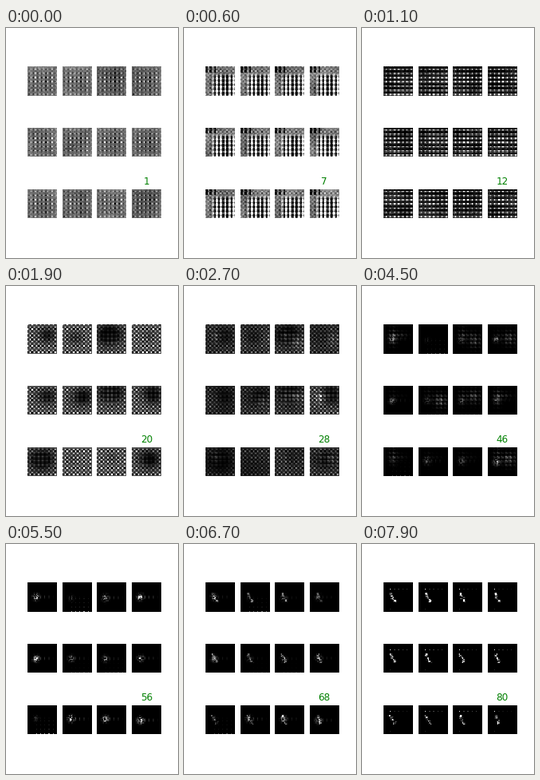
Write a matplotlib script that moves like this. It is 216 px wide and 288 px high and loops after 8 s.

```python
import numpy as np
import matplotlib.pyplot as plt
from matplotlib.animation import FuncAnimation

EPOCHS = 80
SIZE = 28
TILES = 12
Y, X = np.mgrid[:SIZE, :SIZE]
U, V = X / (SIZE - 1), Y / (SIZE - 1)
EDGE = np.minimum(np.minimum(X, SIZE - 1 - X), np.minimum(Y, SIZE - 1 - Y))
INNER = np.clip(EDGE / 5, 0, 1)


def wave(axis, shift):
    """Cosine with the four-pixel period of the upsampling artefacts."""
    return np.cos(np.pi / 2 * (axis - shift))


def dots(x, y, sharp=1.0):
    return np.exp(sharp * (wave(X, x) + wave(Y, y) - 2))


def blob(cx, cy, sx, sy):
    return np.exp(-((U - cx) / sx) ** 2 - ((V - cy) / sy) ** 2)


def ramp(x):
    return 1 / (1 + np.exp(-x))


def smooth(x):
    x = np.clip(x, 0, 1)
    return x * x * (3 - 2 * x)


def field(rng):
    """Slow random variation between about -1 and 1."""
    a, b = rng.uniform(1, 4, 2)
    p, q = rng.uniform(0, 6.3, 2)
    return np.sin(a * U + b * V + p) * np.cos(b * U - a * V + q)


def speckle(rng):
    light = rng.uniform(-0.02, 0.08)
    shade = 0.44 + light - 0.05 * INNER + 0.04 * field(rng)
    grain = 0.5 * dots(3, 2, 1.5) - 0.4 * dots(1, 2) - 0.1 * dots(3, 0)
    return shade + (0.45 + 0.55 * INNER) * grain + rng.normal(0, 0.04, U.shape)


def columns(rng):
    bars = 0.42 - 0.6 * wave(X, 0.3) - 0.3 * wave(Y, 1)
    inside = ramp((U - 0.2) / 0.05) * ramp((V - 0.27) / 0.03)
    rim = 0.48 + 0.2 * wave(X, 2) * wave(Y, 0) + 0.08 * field(rng)
    rim -= 0.4 * (V < 0.2) * (U < 0.38) * (X % 4 < 2)
    img = inside * np.clip(bars, 0, 1) + (1 - inside) * rim
    return img + 0.05 * field(rng) + rng.normal(0, 0.04, U.shape)


def crescents(rng):
    arc = 1.3 * dots(2, 2, 1.3) - 0.75 * dots(2, 1, 1.2)
    haze = 0.16 + 0.07 * field(rng) - 0.12 * dots(0, 0)
    gain = 0.85 + 0.3 * field(rng)
    return haze + gain * arc + rng.normal(0, 0.04, U.shape)


def lattice(rng):
    net = (0.5 + 0.5 * wave(X, 0) * wave(Y, 0)) ** 1.6
    depth = rng.uniform(0, 1.5)
    hole = blob(rng.normal(0.58, 0.12), rng.normal(0.36, 0.06),
                0.1 + 0.3 * depth, 0.1 + 0.25 * depth)
    hole = np.clip(depth * hole, 0, 1)
    dashes = 0.45 * dots(2, 1, 0.8) * (0.6 + 0.4 * field(rng))
    return net * (1 - hole) + hole * dashes


def chevrons(rng):
    power = np.clip(rng.uniform(-0.2, 1.3), 0, 1.2)
    env = power * blob(0.31, rng.normal(0.37, 0.05), 0.14, 0.27)
    env += 0.4 * power * blob(0.6, 0.35, 0.25, 0.12)
    if rng.random() < 0.35:
        env += 0.85 * blob(0.76, rng.uniform(0.3, 0.65), 0.2, 0.25)
    tips = 1.2 * dots(1, 1) + 0.6 * dots(2, 2, 1.5) - 0.5 * dots(2, 0)
    return np.clip(tips, 0, 1) * env + 0.35 * np.clip(env - 0.6, 0, 1)


def smudge(rng):
    power = rng.uniform(0.1, 1)
    cy = rng.normal(0.51, 0.02)
    comb = X % 4 == 0
    grain = 2 * rng.random(U.shape) ** 1.5
    img = power * blob(0.28, cy, 0.09, 0.1) * grain
    img += 0.4 * power * comb * blob(0.43, cy, 0.3, 0.05) * (U > 0.35)
    rest = np.clip(1 - 2 * power, 0, 1)
    return img + rest * comb * (U > 0.2) * (0.9 * (Y == 27)
                                            + 0.12 * (Y % 4 == 3) * (V > 0.45))


def squiggle(rng):
    lean = rng.normal(0, 0.7, (SIZE, 1))
    path = 6.5 + 3.5 * smooth((Y - 10) / 8) + lean
    stroke = np.exp(-((X - path) / 0.9) ** 2) * (Y >= 10) * (Y <= 18)
    return stroke * 1.4 * rng.random(U.shape)


def sparks(rng):
    """Isolated pixels that light up at the very end."""
    row = (Y == 6) & (X % 4 == 2) & (X > 6) & (X < 23)
    low = (X == 6) & (Y == 25)
    return (0.95 * ((X == 6) & (Y == 6)) + rng.uniform(0.05, 0.3) * row
            + 0.15 * low)


STAGES = {1: speckle, 7: columns, 12: crescents, 20: lattice,
          37: chevrons, 56: smudge, 80: squiggle}
KEYS = list(STAGES)
LOOKS = [[draw(np.random.default_rng(100 * key + i)) for i in range(TILES)]
         for key, draw in STAGES.items()]
SPARKS = [sparks(np.random.default_rng(i)) for i in range(TILES)]


def sample(epoch, i):
    s = min(np.searchsorted(KEYS, epoch, side="right") - 1, len(KEYS) - 2)
    t = (epoch - KEYS[s]) / (KEYS[s + 1] - KEYS[s])
    w = smooth(t)
    rng = np.random.default_rng(1000 * epoch + i)
    # Training wobble: tiles flicker most halfway between two looks.
    wobble = 1 + 4 * t * (1 - t) * (0.18 * rng.normal() + 0.2 * field(rng))
    img = ((1 - w) * LOOKS[s][i] + w * LOOKS[s + 1][i]) * wobble
    img = img + SPARKS[i] * smooth((epoch - 72) / 4)
    return np.clip(img, 0, 1)


fig, axes = plt.subplots(3, 4, figsize=(3, 4), dpi=72, facecolor="white")
fig.subplots_adjust(left=0.125, right=0.9, bottom=0.125, top=0.88,
                    wspace=0.2, hspace=0.2)
images = []
for i, ax in enumerate(axes.flat):
    ax.axis("off")
    images.append(ax.imshow(sample(1, i), cmap="gray", vmin=0, vmax=1,
                            interpolation="nearest"))
title = axes[-1, -1].set_title("1", color="green", fontsize=12,
                               fontfamily="DejaVu Sans")


def update(frame):
    epoch = frame + 1
    for i, im in enumerate(images):
        im.set_data(sample(epoch, i))
    title.set_text(str(epoch))
    return [*images, title]


anim = FuncAnimation(fig, update, frames=EPOCHS, interval=100, repeat=True,
                     repeat_delay=0, blit=False)
plt.show()
```
